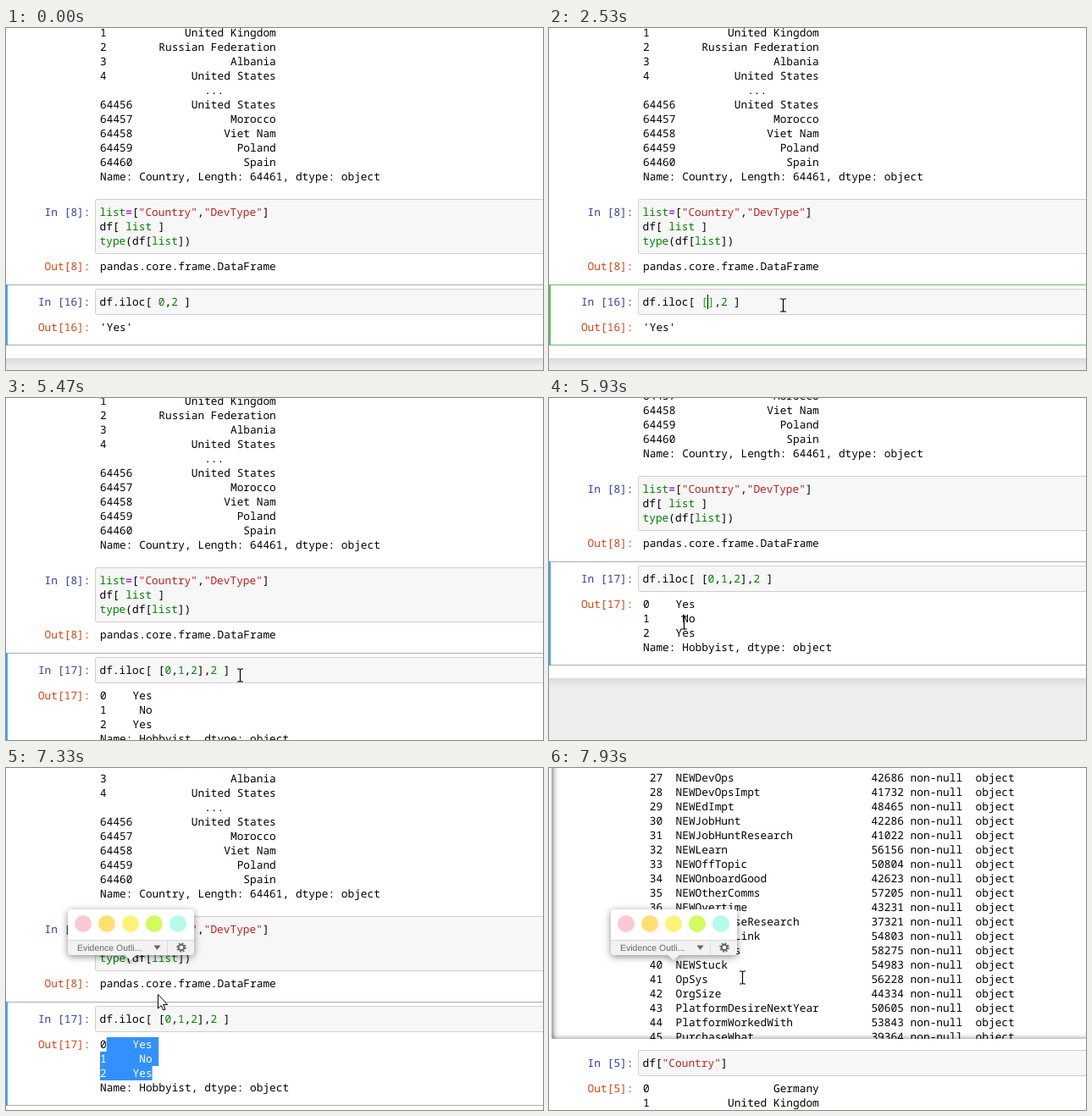
Write an HTML page that moves like this. It is 634 by 404 pixels and loops after 8000 ms.

```html
<!DOCTYPE html>
<html lang="en">
<head>
<meta charset="utf-8">
<title>Notebook: selecting rows with iloc</title>
<style>
  html, body { margin: 0; width: 100%; height: 100%; overflow: hidden; background: #fff; }
  svg { display: block; width: 634px; height: 404px; }
  text {
    font: 12.833px "Noto Sans Mono", "DejaVu Sans Mono", monospace;
    white-space: pre; text-rendering: geometricPrecision; fill: #000;
  }
  .in, .out { text-anchor: end; }
  .in { fill: #303f9f; }
  .out { fill: #d84315; }
  .str { fill: #ba2121; }
  .num, .kw { fill: #008000; }
  .op { fill: #aa22ff; font-weight: bold; }
  .match { fill: #0b0; }
  .sel { fill: #fff; }
  .box { fill: #f7f7f7; stroke: #cfcfcf; }
  .well { height: 100%; border-radius: 2px; box-shadow: inset 0 2px 8px rgba(0, 0, 0, .8); }
  #popup { filter: drop-shadow(0 2px 4px rgba(0, 0, 0, .45)); }
  #popup text { font: 10.5px "Liberation Sans", Arial, sans-serif; fill: #666; }
</style>
</head>
<body>
<svg viewBox="0 0 634 404">
  <defs>
    <linearGradient id="edge" x2="0" y2="1">
      <stop stop-color="#575757" stop-opacity=".13"/>
      <stop offset="1" stop-color="#575757" stop-opacity="0"/>
    </linearGradient>
  </defs>
  <g id="doc">
    <foreignObject x="3" y="-900" width="700" height="830"><div class="well"></div></foreignObject>
    <g id="page"></g>
    <g id="live"></g>
    <g id="foot">
      <rect width="634" height="500" fill="#eee"/>
      <rect width="634" height="11" fill="url(#edge)"/>
    </g>
  </g>
  <g id="popup">
    <path d="M77 167H218a4 4 0 0 1 4 4V217a4 4 0 0 1-4 4H154L147 227 140 221H77a4 4 0 0 1-4-4V171a4 4 0 0 1 4-4Z" fill="#f2f2f2"/>
    <path d="M73 203V171a4 4 0 0 1 4-4H218a4 4 0 0 1 4 4V203Z" fill="#fff"/>
    <path d="M73 203.5H222M190.5 204V221" stroke="#d8d8d8"/>
    <g id="dots"></g>
    <text x="84" y="216">Evidence Outli...</text>
    <path d="M174.5 209.5H182.5L178.5 215Z" fill="#666"/>
    <g fill="none" stroke="#666">
      <circle cx="207" cy="212" r="3.3" stroke-width="2"/>
      <circle cx="207" cy="212" r="4.9" stroke-width="1.8" stroke-dasharray="1.92"/>
    </g>
  </g>
  <g id="cursor">
    <path id="beam" d="M-3.5-7.5H-1.5Q0-7.5 0-6Q0-7.5 1.5-7.5H3.5M0-6V6M-3.5 7.5H-1.5Q0 7.5 0 6Q0 7.5 1.5 7.5H3.5" fill="none" stroke="#000" stroke-width="1.2"/>
    <path id="arrow" d="M0 0V16.5L3.8 13 6.2 18.5 8.6 17.5 6.2 12H11.2Z" fill="#fff" stroke="#000"/>
  </g>
</svg>
<script>
const $ = id => document.getElementById(id);
const LOOP = 8000, CHAR = 7.7, LINE = 17, CODE_X = 110.5, OUT_X = 111;
const EDIT = 750, RUN = 4840, PRESS = 6540, RELEASE = 6860, POPUP = 6930;

// --- drawing helpers ---
const text = (x, y, s, cls = '') => `<text class="${cls}" x="${x}" y="${y}">${s}</text>`;
const prompt = (kind, n, y) => text(99.5, y, `${kind === 'in' ? 'In ' : 'Out'}[${n}]:`, kind);
const rect = (x, y, w, h, fill) => `<rect x="${x}" y="${y}" width="${w}" height="${h}" fill="${fill}"/>`;
const lines = (y, rows) => rows.map((s, i) => text(OUT_X, y + i * LINE, s)).join('');

const KINDS = ['str', 'num', 'kw', 'op', 'match', 'match'];
const TOKENS = /("[^"]*")|(\d+)|(list|type)|(=)|(?<=\[ )(\[)|(\])(?=,)/g;
function paint(s, matching) {
  return s.replace(TOKENS, (m, ...groups) => {
    const kind = KINDS[groups.slice(0, 6).findIndex(g => g !== undefined)];
    return kind === 'match' && !matching ? m : `<tspan class="${kind}">${m}</tspan>`;
  });
}

function inputCell(n, y, rows, matching) {
  return `<rect class="box" x="105.5" y="${y - 19.5}" width="700" height="${13 + rows.length * LINE}" rx="2"/>`
    + prompt('in', n, y)
    + rows.map((s, i) => text(CODE_X, y + i * LINE, paint(s, matching))).join('');
}

// --- static page ---
const columns = `NEWDevOps 42686,NEWDevOpsImpt 41732,NEWEdImpt 48465,NEWJobHunt 42286,
NEWJobHuntResearch 41022,NEWLearn 56156,NEWOffTopic 50804,NEWOnboardGood 42623,NEWOtherComms 57205,
NEWOvertime 43231,NEWPurchaseResearch 37321,NEWPurpleLink 54803,NEWSOSites 58275,NEWStuck 54983,
OpSys 56228,OrgSize 44334,PlatformDesireNextYear 50605,PlatformWorkedWith 53843,PurchaseWhat 39364`
  .split(',').map((entry, i) => {
    const [name, count] = entry.trim().split(' ');
    return ` ${27 + i}  ${name.padEnd(30)}${count} non-null  object`;
  });

const country = (n, name) => n + name.padStart(27 - String(n).length);
const series = [
  ...['Germany', 'United Kingdom', 'Russian Federation', 'Albania', 'United States']
    .map((name, i) => country(i, name)),
  ' '.repeat(16) + '...',
  ...['United States', 'Morocco', 'Viet Nam', 'Poland', 'Spain']
    .map((name, i) => country(64456 + i, name)),
  'Name: Country, Length: 64461, dtype: object'
];

$('page').innerHTML = lines(-374, columns)
  + rect(0, -70, 634, 14, '#fff')
  + inputCell(5, -37, ['df["Country"]'])
  + prompt('out', 5, -7) + lines(-7, series)
  + inputCell(8, 222, ['list=["Country","DevType"]', 'df[ list ]', 'type(df[list])'])
  + prompt('out', 8, 286) + lines(286, ['pandas.core.frame.DataFrame']);

$('dots').innerHTML = ['#fbc8d4', '#ffdf70', '#fff277', '#d2fb5c', '#b5fbe9']
  .map((c, i) => `<circle cx="${91 + i * 28}" cy="184" r="10" fill="${c}"/>`).join('');

// --- timeline ---
// typed index, caret column, caret visible
const typing = [
  [0, '0', 10, 0], [EDIT, '0', 10, 1], [1290, '0', 10, 0], [1670, '', 9, 1],
  [1900, '[]', 10, 1], [1980, '[]', 11, 1], [2530, '[]', 10, 1], [3080, '[]', 10, 0],
  [3230, '[0]', 11, 1], [3460, '[0,]', 12, 1], [3690, '[0,1]', 13, 1],
  [3770, '[0,1,]', 14, 1], [4000, '[0,1,2]', 15, 1], [4460, '[0,1,2]', 15, 0]
];
// stretches of movement: start, end, number of steps
const moves = [[70, 520, 7], [750, 1060, 5], [5470, 5930, 7], [6080, 6240, 3], [6390, 7170, 11], [7250, 7930, 10]];
const scrollKeys = [[5460, 0], [5470, 2], [5560, 18], [5780, 88], [5930, 110], [7170, 110], [7250, 84], [7326, 27], [7930, -390]];
const cursorKeys = [
  [70, 441, 362], [300, 270, 311], [445, 200, 304], [520, 191, 319], [750, 192, 322],
  [1060, 276, 327], [5470, 276, 327], [5930, 159, 265], [6240, 184, 290], [6390, 182, 287],
  [PRESS, 173, 280], [RELEASE, 119, 245], [POPUP, 121, 246], [7170, 177, 266],
  [7326, 179, 267], [7930, 228, 247]
];

function snap(t) {
  const move = moves.findLast(m => t >= m[0]);
  if (!move) return 0;
  const [a, b, n] = move, step = (b - a) / (n - 1);
  return Math.min(b, a + Math.floor((t - a + 3) / step) * step);
}

function track(keys, t) {
  const i = keys.findIndex(k => k[0] > t);
  if (i === 0) return keys[0].slice(1);
  if (i < 0) return keys.at(-1).slice(1);
  const p = keys[i - 1], q = keys[i], f = (t - p[0]) / (q[0] - p[0]);
  return p.slice(1).map((v, j) => v + (q[j + 1] - v) * f);
}

const result = ['0    Yes', '1     No', '2    Yes', 'Name: Hobbyist, dtype: object'];

// The selection runs from the dragged point to the end of the third row.
function output(head) {
  return result.map((s, r) => {
    const y = 358 + r * LINE;
    if (!head || r < head.row || r > 2) return text(OUT_X, y, s);
    const from = r === head.row ? head.col : 0, to = r === 2 ? 8 : 9;
    return rect(OUT_X + from * CHAR, y - 13, (to - from) * CHAR, LINE, '#3390ff')
      + text(OUT_X, y, `${s.slice(0, from)}<tspan class="sel">${s.slice(from)}</tspan>`);
  }).join('');
}

function dragHead(t, scroll) {
  if (t < PRESS) return null;
  const [x, y] = track(cursorKeys, Math.min(t, RELEASE));
  const clamp = (v, hi) => Math.max(0, Math.min(hi, v));
  return t >= RELEASE ? { row: 0, col: 1 } : {
    row: clamp(Math.floor((y + scroll - 345) / LINE), 2),
    col: clamp(Math.round((x - OUT_X) / CHAR), 8)
  };
}

function activeCell(t, step, scroll) {
  const [, index, col, on] = typing.findLast(k => t >= k[0]);
  const editing = t >= EDIT && t < RUN, done = t >= RUN, n = done ? 17 : 16;
  const height = done ? 123 : 72, line = editing ? '#66bb6a' : '#ababab';
  return rect(0, 303, 634, 1, line) + rect(0, 302 + height, 634, 1, line)
    + rect(0, 303, 2, height, editing ? '#66bb6a' : '#42a5f5')
    + inputCell(n, 328, [`df.iloc[ ${index},2 ]`], editing)
    + (editing && on ? rect(Math.floor(CODE_X + col * CHAR), 315, 1, LINE, '#000') : '')
    + prompt('out', n, 358)
    + (done ? output(dragHead(step, scroll)) : text(OUT_X, 358, "'Yes'"));
}

let shown = '';
function draw(t) {
  const step = snap(t), [scroll] = track(scrollKeys, step), top = Math.round(scroll);
  const cell = activeCell(t, step, top);
  if (cell !== shown) $('live').innerHTML = shown = cell;

  $('doc').setAttribute('transform', `translate(0 ${-top})`);
  $('foot').setAttribute('transform', `translate(0 ${t < RUN ? 390 : 441})`);
  $('popup').style.display = step >= POPUP ? '' : 'none';

  const [x, y] = track(cursorKeys, step).map(Math.round);
  const arrow = step < 200 || (step > 7150 && step < 7450);
  $('cursor').style.display = t < 70 ? 'none' : '';
  $('cursor').setAttribute('transform', `translate(${x + .5} ${y + .5})`);
  $('arrow').style.display = arrow ? '' : 'none';
  $('beam').style.display = arrow ? 'none' : '';
}

const start = performance.now();
function tick() {
  draw((performance.now() - start) % LOOP);
  requestAnimationFrame(tick);
}
tick();
</script>
</body>
</html>
```
